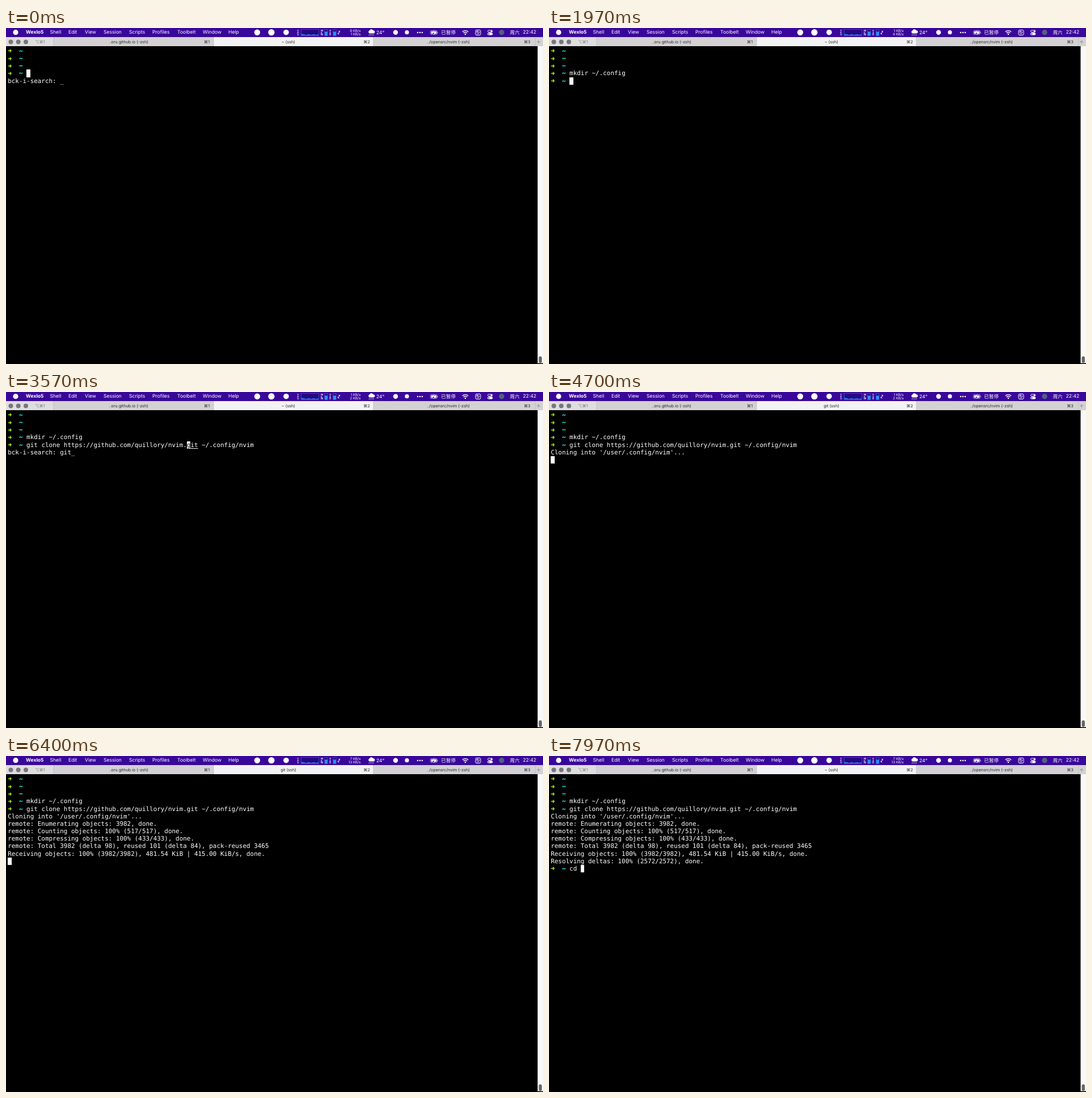
An HTML page for the animation above (8 s loop, 947 by 592 pixels).

```html
<!DOCTYPE html>
<html lang="en">
<head>
<meta charset="utf-8">
<title>Terminal session</title>
<style>
  html, body { margin: 0; width: 100%; height: 100%; overflow: hidden; background: #000; }
  body { position: relative; text-rendering: geometricPrecision; }
  #chrome { position: absolute; left: 0; top: 0; }
  #chrome text { font-family: Inter, "Noto Sans CJK SC", "Noto Sans CJK", "DejaVu Sans", sans-serif; }
  .menu text { font-size: 8.6px; fill: #fff; }
  .menu .tiny { font-size: 6.1px; }
  .menu .label { font-size: 4.3px; font-weight: 600; }
  .tabs text { font-size: 7.2px; fill: #222; text-anchor: middle; }
  #screen {
    position: absolute; left: 3.2px; top: 33.95px; color: #fff; white-space: pre;
    font: 10.93px/13.17px "DejaVu Sans Mono", monospace;
  }
  #screen div { position: absolute; left: 0; height: 13.17px; }
  #screen svg { position: absolute; left: 0; top: 2.5px; }
  #screen b { color: #20e4e4; -webkit-text-stroke: .3px; }
  #screen u { display: inline-block; height: 13.17px; vertical-align: top; background: #fff; color: #000; text-decoration: none; }
  #screen s { text-decoration: underline 1px; text-underline-offset: 2px; }
</style>
</head>
<body>
<svg id="chrome" width="947" height="592" viewBox="0 0 947 592">
  <rect width="947" height="592"/>
  <g class="menu">
    <rect width="947" height="16" fill="#39089a"/>
    <g id="menuItems"></g>
    <g fill="#fff">
      <circle cx="17" cy="7.7" r="4.6"/>
      <circle cx="443" cy="7.7" r="5.2"/>
      <circle cx="468" cy="7.7" r="5.6"/>
      <circle cx="494" cy="7.7" r="4.8"/>
      <circle cx="687" cy="7.7" r="4.2"/>
      <circle cx="707" cy="7.7" r="3.6"/>
      <circle cx="726" cy="8" r="1.3"/><circle cx="730" cy="8" r="1.3"/><circle cx="734" cy="8" r="1.3"/>
    </g>
    <g id="meters"></g>
    <path d="M585.5 10.5 588.5 5.5M586.4 5.6H588.6V7.8M585.4 8.4V10.6H587.6" fill="none" stroke="#fff" stroke-width=".8"/>
    <text class="tiny" id="up" x="625.5" y="7.3" text-anchor="end"></text>
    <text class="tiny" id="down" x="625.5" y="13.3" text-anchor="end"></text>
    <path d="M641 9.5a2.6 2.6 0 0 1 0-5 3.6 3.6 0 0 1 6.5-.2 2.6 2.6 0 0 1 .6 5.2z" fill="#fff"/>
    <path d="M641 10.5l-1 3M643.5 10.5l-1 3M646 10.5l-1 3M648.5 10.5l-1 3" stroke="#ddd" stroke-width=".8"/>
    <text x="653" y="10.7">24°</text>
    <rect x="748.4" y="4.6" width="12" height="6.8" rx="1.8" fill="none" stroke="#c9b9ec" stroke-width=".8"/>
    <path d="M750 6h4l-1.5 4H750zM756 6h3v4h-4zM761.5 7v2" fill="#fff" stroke="#fff" stroke-width=".5"/>
    <path d="M755.5 3.5 752.5 8.3H755L754 12.5 757.5 7.4H755z" fill="#fff"/>
    <text x="767.3" y="10.7">已暂停</text>
    <g fill="none" stroke="#fff" stroke-width="1.4">
      <path d="M804.8 6.8a7.4 7.4 0 0 1 10.4 0M806.8 8.9a4.5 4.5 0 0 1 6.4 0"/>
      <circle cx="810" cy="11" r=".6"/>
      <rect x="828" y="3.5" width="9" height="9" rx="2" stroke-width="1"/>
      <path d="M830 5.5h2.5v2H830zM833.5 10.5 835 6M830 10h3" stroke-width=".9"/>
      <rect x="849.5" y="4" width="8.5" height="3.3" rx="1.65" stroke-width=".9"/>
      <rect x="849.5" y="8.8" width="8.5" height="3.3" rx="1.65" stroke-width=".9" fill="#fff"/>
    </g>
    <circle cx="856" cy="5.7" r="1.4" fill="#fff"/>
    <circle cx="851.4" cy="10.4" r="1" fill="#39089a"/>
    <circle cx="874" cy="7.7" r="4.7" fill="#52617c"/>
    <text x="888.5" y="10.7">周六</text>
    <text x="911.5" y="10.4">22:42</text>
  </g>
  <g class="tabs">
    <rect y="16" width="947" height="16" fill="#d3d1d4"/>
    <rect y="16" width="84" height="16" fill="#dedddf"/>
    <rect x="366" y="16" width="282" height="16" fill="#f3f2f4"/>
    <path d="M84 16v16M366 16v16M648 16v16M933.5 16v16" stroke="#bdbbbe" stroke-width=".8"/>
    <g fill="#77767a"><circle cx="8.5" cy="24.4" r="4"/><circle cx="21.7" cy="24.4" r="4"/><circle cx="35" cy="24.4" r="4"/></g>
    <text x="60" y="27" style="fill:#777">⌥⌘1</text>
    <text x="216" y="27">..oru.github.io (-zsh)</text><text x="354" y="27">⌘1</text>
    <text x="498" y="27" id="title"></text><text x="636" y="27">⌘2</text>
    <text x="780" y="27">../opensrc/nvim (-zsh)</text><text x="919" y="27">⌘3</text>
    <path d="M936 24.4h6.5M939.2 21.1v6.5" stroke="#888" stroke-width=".8"/>
  </g>
  <rect x="937.5" y="32" width="9.5" height="558.5" fill="#f8f8f8"/>
  <rect x="939.6" y="578.5" width="5.4" height="11.5" rx="2.7" fill="#666"/>
</svg>
<div id="screen"></div>

<script>
const $ = id => document.getElementById(id);
const LOOP = 8000, ROW = 13.17;

const menu = [['Wexlo5', 35], ['Shell', 77.5], ['Edit', 110], ['View', 139], ['Session', 172], ['Scripts', 217],
  ['Profiles', 258], ['Toolbelt', 302], ['Window', 347], ['Help', 392]];
$('menuItems').innerHTML = menu.map(([name, x], i) =>
  `<text x="${x}" y="10.4" font-weight="${i ? 400 : 700}">${name}</text>`).join('');

const box = (x, y, w, h, style) => `<rect x="${x}" y="${y}" width="${w}" height="${h}" ${style}/>`;
const BLUE = 'fill="#2b8cff"', FRAME = 'fill="#280880" stroke="#2769d8" stroke-width=".7"';
const label = (word, x) => [...word].map((c, i) =>
  `<text class="label" x="${x}" y="${5.6 + i * 3.9}">${c}</text>`).join('');
$('meters').innerHTML =
  label('CPU', 513.5) + box(520.4, 2.6, 31.4, 10.8, FRAME) +
  Array.from({ length: 10 }, (_, i) => {
    const h = 1.5 + .6 * Math.sin(i * 2.1) + (i ? 0 : 1);
    return box(521.2 + i * 3, 13 - h, 2.5, h, BLUE);
  }).join('') +
  label('MEM', 555.3) + box(562, 2.6, 5, 10.8, FRAME) + box(562, 6.4, 5, 7, BLUE) +
  label('SSD', 570.3) + box(577, 2.6, 5, 10.8, FRAME) + box(577, 6.4, 5, 7, BLUE);

const ARROW = '<svg width="8" height="8"><path d="M.7 4H6M3.8 1.6 6.2 4 3.8 6.4" fill="none" stroke="#9be015" stroke-width="1.4"/></svg>';
const cursor = (line = '') => `<u>${line[0] || ' '}</u>${line.slice(1)}`;
const prompt = cmd => `${ARROW}   <b>~</b> ${cmd}`;
const typed = (word, times, t) => word.slice(0, times.filter(at => t >= at).length);

// Incremental history search: cursor on the match, rest of it underlined.
function search(query, cmd) {
  const at = cmd.lastIndexOf(query), end = at + query.length;
  const line = query
    ? `${cmd.slice(0, at)}<u>${query[0]}</u><s>${cmd.slice(at + 1, end)}</s>${cmd.slice(end)}`
    : cursor();
  return [prompt(line), `bck-i-search: ${query}_`];
}

function progress(name, total, k, tail = '') {
  const n = Math.round(total * Math.min(1, k));
  const pct = String(Math.floor(100 * n / total)).padStart(3);
  return `${name}: ${pct}% (${n}/${total})${tail}`;
}

const MKDIR = 'mkdir ~/.config';
const CLONE = 'git clone https://github.com/quillory/nvim.git ~/.config/nvim';
const T = { mkdir: 1770, find: 2400, clone: 3900, count: 5050, pack: 5250, total: 5690, receive: 5760, received: 6340, done: 6450 };

function cloneOutput(t) {
  const rows = ["Cloning into '/user/.config/nvim'..."];
  const live = line => [...rows, cursor(line)];
  if (t < T.count) return live();
  rows.push('remote: Enumerating objects: 3982, done.');
  if (t < T.pack) return live(progress('remote: Counting objects', 517, (t - T.count) / 190));
  rows.push('remote: Counting objects: 100% (517/517), done.');
  const packed = (t - T.pack) / 280;
  if (packed < 1) return live(progress('remote: Compressing objects', 433, packed));
  rows.push('remote: Compressing objects: 100% (433/433), done.');
  if (t < T.total) return live();
  rows.push('remote: Total 3982 (delta 98), reused 101 (delta 84), pack-reused 3465');
  if (t < T.received) {
    const k = Math.max(0, (t - T.receive) / (T.received - T.receive));
    return live(progress('Receiving objects', 3982, k, k > .5 ? ', 212.00 KiB | 415.00 KiB/s' : ''));
  }
  rows.push('Receiving objects: 100% (3982/3982), 481.54 KiB | 415.00 KiB/s, done.');
  if (t < T.done) return live();
  rows.push('Resolving deltas: 100% (2572/2572), done.');
  return [...rows, prompt(typed('cd ', [7400, 7560, 7730], t) + cursor())];
}

function screenRows(t) {
  const rows = Array(3).fill(prompt(''));
  if (t < T.mkdir) return [...rows, ...search(typed('mkdir', [170, 300, 420, 540, 660], t), MKDIR)];
  rows.push(prompt(MKDIR));
  if (t < T.find) return [...rows, prompt(cursor())];
  if (t < T.clone) {
    const query = typed('git', [2800, 2930, 3060], t);
    return [...rows, ...search(query, query === 'g' ? MKDIR : CLONE)];
  }
  return [...rows, prompt(CLONE), ...cloneOutput(t)];
}

const traffic = [[0, 0, 1], [400, 1, 4], [2330, 1, 2], [5670, 7, 13]];
let shown = '';

function draw() {
  const t = performance.now() % LOOP;
  const html = screenRows(t).map((row, i) => `<div style="top:${(i * ROW).toFixed(2)}px">${row}</div>`).join('');
  if (html !== shown) $('screen').innerHTML = shown = html;
  const [, up, down] = traffic.filter(([at]) => t >= at).pop();
  $('up').textContent = `${up} KB/s`;
  $('down').textContent = `${down} KB/s`;
  $('title').textContent = t >= T.clone && t < T.done ? 'git (ssh)' : '~ (ssh)';
  requestAnimationFrame(draw);
}
draw();
</script>
</body>
</html>
```
